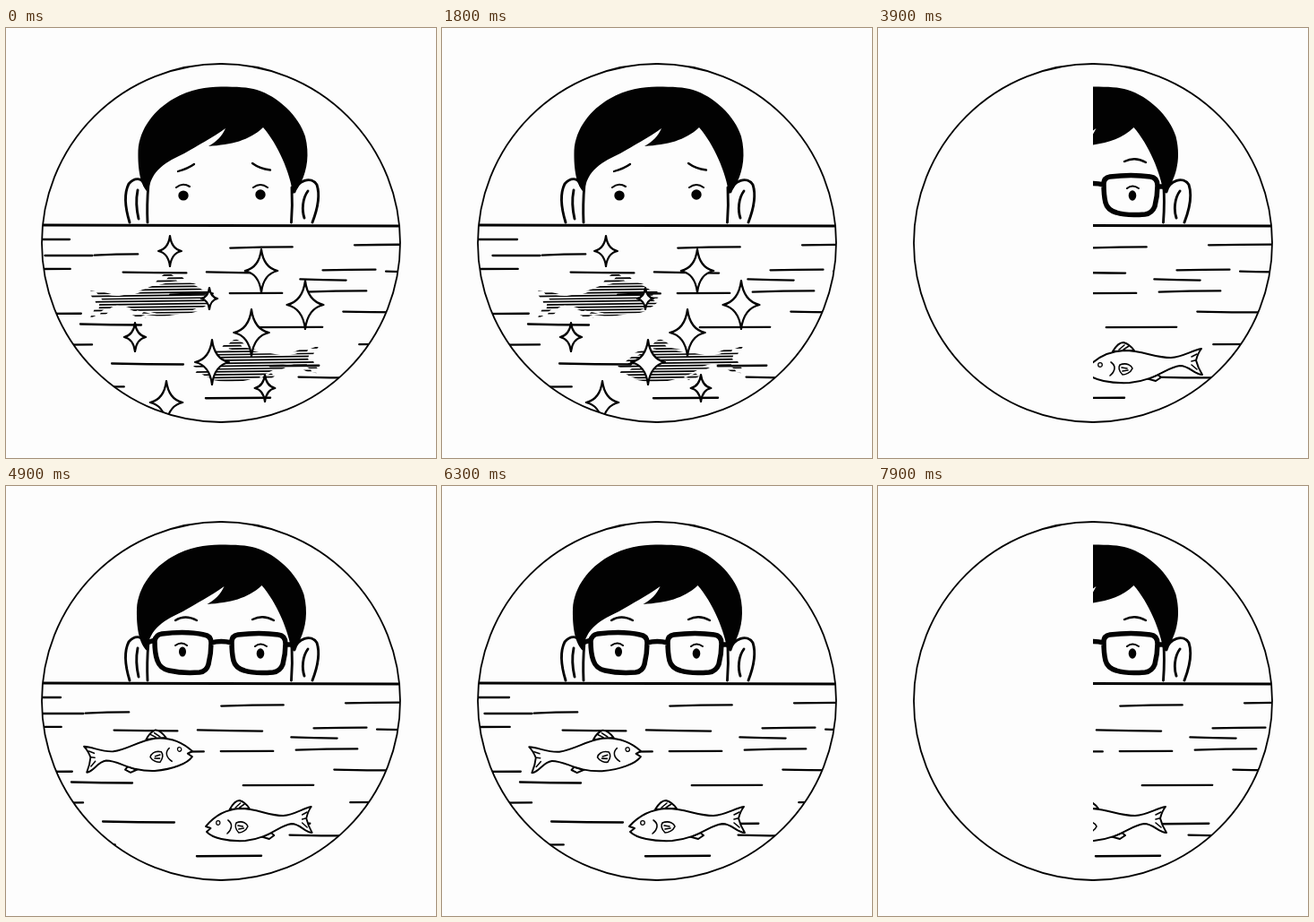
Write an HTML page with a canvas that moves like this. It is 480x480 px and loops after 8 s.

```html
<!DOCTYPE html>
<html lang="en">
<head>
<meta charset="utf-8">
<title>Man in the water</title>
<style>
html, body { margin: 0; width: 100%; height: 100%; overflow: hidden; background: #fdfdfd; }
canvas { display: block; width: 480px; height: 480px; }
</style>
</head>
<body>
<canvas id="stage" width="480" height="480"></canvas>
<script>
const ctx = document.getElementById('stage').getContext('2d');
const INK = '#020202', PAPER = '#fdfdfd';

// Centres of the ripples, by length
const longRipples = [
  [38, 236], [289, 245], [433, 242], [170, 273], [264, 273], [36, 269], [372, 294], [50, 319],
  [419, 317], [121, 331], [318, 334], [63, 354], [433, 353], [162, 375], [366, 390], [263, 413], [96, 401]
];
const shortRipples = [
  [74, 254], [127, 253], [387, 270], [453, 272], [358, 281], [283, 296], [211, 297], [326, 377]
];

// Sparkles: centre and half height
const sparkles = [
  [183, 249, 17], [285, 271, 24], [227, 302, 12], [334, 309, 27], [274, 340, 26],
  [144, 345, 16], [230, 373, 25], [289, 402, 15], [179, 418, 24]
];

const hair = new Path2D(`M159 184 C150 176 147 158 147.500 137 C149 112 166 91 187 79
  C206 68 224 66 240 65.500 C258 65.500 270 66 280 69 C303 76 327 98 334 121 C339 141 336 158 330 171
  C327 177 324 182 320 185 C318 163 303 129 287 111 C271 126 252 130 226 132
  C235 127 241 121 245 112 C230 123 214 131 199 140 C180 149 161 158 159 184Z`);
const head = new Path2D(`M159 174 Q157 198 158 217 M319 178 Q320 198 318.500 217
  M155 176 C152 166 143 167 137 174 C131 186 134 204 138 217 M147 181 Q144 196 148 213
  M322 183 C325 170 341 165 347 175 C351 187 347 204 342 217 M337 182 C331 190 330 203 333 212`);
const sadBrows = new Path2D('M192 160 Q203 157 210 152 M275 151 Q283 157 295 158.500');
const lids = new Path2D('M190 178 Q197 172 205 177 M276 178 Q284 172 292 178');
const calmBrows = new Path2D('M189 150 Q200 143 213 150 M275 149 Q287 143 299 150');
const smallLids = new Path2D('M189 178 Q196 173 202 178 M278 179 Q284 174 291 179');
const glasses = new Path2D(`M174 165 C190 163 208 163 221 166 Q229 167 229 175 C229 184 228 191 226 199
  Q224 207 216 208 C204 209 191 208 182 206 Q172 204 169 195 C166 187 166 180 166 173 Q167 166 174 165Z
  M259 166 C274 164 291 164 304 166 Q312 167 312 176 C312 184 311 191 309 199
  Q306 207 298 208 C287 209 275 209 266 206 Q256 203 254 195 C252 187 252 180 252 174 Q252 167 259 166Z
  M229 175 Q240 172 252 175 M312 177 L322 177 M166 172 L160 174`);

// Fish facing left, mouth at the origin
const fishBody = new Path2D(`M0 0 C8 -9 20 -19 42 -20 C62 -20 76 -12 94 -12 C108 -13 117 -20 128 -22
  Q124 -17 122 -9 Q124 -1 129 7 C120 7 115 -3 104 -3 C88 -1 78 13 48 16 C26 17 8 13 1 6 L6 2Z`);
const fishFins = new Path2D(`M29 -19 Q35 -29 41 -29 Q48 -27 53 -20Z M66 11 L77 14 L83 10 L78 6Z`);
const fishMarks = new Path2D(`M36 -21 L42 -26 M41 -21 L47 -25 M71 11 L78 8
  M27 -7 C33 -3 32 3 26 8 M37 -4 C45 -7 50 -3 51 0 C49 5 43 7 40 7 Q34 1 37 -4Z
  M39 -1 L45 0 M40 3 L46 2 M117 -13 L123 -16 M117 -8 L121 -9 M117 -4 L123 1`);
const silhouette = new Path2D(fishBody);
silhouette.addPath(fishFins);

function stroke(path, width) {
  ctx.lineWidth = width;
  path ? ctx.stroke(path) : ctx.stroke();
}

function ripples(list, length, dx, dy) {
  list.forEach(([x, y], i) => {
    const half = length / 2 + 3 * Math.sin(i * 4), tilt = Math.sin(i * 5) * 0.6;
    ctx.beginPath();
    ctx.moveTo(x + dx - half, y + dy - tilt);
    ctx.quadraticCurveTo(x + dx, y + dy + tilt, x + dx + half, y + dy + tilt);
    stroke(null, 2.3);
  });
}

function water(dx, dy) {
  ripples(longRipples, 74, dx, dy);
  ripples(shortRipples, 53, dx, dy);
}

// Fish silhouette filled with ragged horizontal strokes
function shadow(x, y, sx, angle) {
  for (let row = -29; row < 27; row += 3.2) {
    ctx.save();
    ctx.translate(x + 5 * Math.sin(row * 9), y);
    ctx.save();
    const shape = new Path2D();
    shape.addPath(silhouette, new DOMMatrix().rotate(angle * 180 / Math.PI).scale(sx, 1.05));
    ctx.restore();
    ctx.clip(shape);
    ctx.beginPath();
    ctx.moveTo(-150, row + 2);
    ctx.lineTo(150, row - 2);
    stroke(null, 1.7);
    ctx.restore();
  }
}

function sparkle(x, y, h) {
  const w = h * 0.76, k = 0.14;
  ctx.beginPath();
  ctx.moveTo(x, y - h);
  for (const [sx, sy, ex, ey] of [[1, -1, w, 0], [1, 1, 0, h], [-1, 1, -w, 0], [-1, -1, 0, -h]])
    ctx.quadraticCurveTo(x + sx * w * k, y + sy * h * k, x + ex, y + ey);
  ctx.closePath();
  ctx.fill();
  stroke(null, 2.2);
}

function fish(x, y, sx, angle) {
  ctx.save();
  ctx.translate(x, y);
  ctx.rotate(angle);
  ctx.scale(sx, 1);
  for (const path of [fishFins, fishBody]) {
    ctx.fill(path);
    stroke(path, 2);
  }
  stroke(fishMarks, 1.6);
  ctx.beginPath();
  ctx.arc(15, -4, 2.3, 0, 7);
  stroke(null, 1.3);
  ctx.restore();
}

function pupil(x, y, rx, ry) {
  ctx.beginPath();
  ctx.ellipse(x, y, rx, ry, 0, 0, 7);
  ctx.fill();
}

function face(worn) {
  ctx.fillStyle = INK;
  ctx.save();
  if (worn) ctx.translate(-1.5, 0);
  ctx.fill(hair);
  ctx.restore();
  stroke(head, 2.9);
  stroke(worn ? calmBrows : sadBrows, 2.3);
  stroke(worn ? smallLids : lids, 2.1);
  pupil(worn ? 197 : 198, worn ? 185 : 187, worn ? 4 : 5.7, 5.5);
  pupil(284, worn ? 187 : 186, worn ? 4.3 : 5.7, 5.7);
  if (worn) stroke(glasses, 5.5);
  ctx.fillStyle = PAPER;
}

function sadScene(step, alt) {
  water(step - (alt ? 12 : 4), alt ? 2 : 0);
  const size = alt ? 0.98 : 1.02;
  shadow(228 + step, 298, -size, -0.14);
  shadow(214 - step, 378, size, 0);
  for (const [x, y, h] of sparkles)
    alt ? sparkle(x + 3, y + 3, Math.min(26, 41 - h)) : sparkle(x, y, h);
}

function fishScene(n, alt) {
  const shift = n - 63;
  water(shift, 0);
  fish(222 + shift, 296, alt ? -0.93 : -0.96, -0.14);
  fish(209 - shift, 380, alt ? 0.92 : 1, 0);
}

function ring() {
  ctx.beginPath();
  ctx.arc(240, 240, 200, 0, 2 * Math.PI);
}

function draw(now) {
  const n = Math.floor(now % 8000 / 100);
  const step = Math.max(0, n - 5);
  const alt = step > 0 && n % 4 < 2;
  const second = n >= 35;
  const edge = second ? Math.max(440 - 40 * (n - 34), 40 * (n - 73)) : Math.min(440, 40 * (n - 19));

  ctx.fillStyle = PAPER;
  ctx.strokeStyle = INK;
  ctx.lineCap = ctx.lineJoin = 'round';
  ctx.fillRect(0, 0, 480, 480);
  if (edge < 440) {
    ctx.save();
    ring();
    ctx.clip();
    ctx.beginPath();
    ctx.rect(Math.max(0, edge), 0, 480, 480);
    ctx.clip();
    face(second);
    ctx.beginPath();
    ctx.moveTo(40, 220);
    ctx.lineTo(440, 221);
    stroke(null, 2.9);
    second ? fishScene(n, alt) : sadScene(step, alt);
    ctx.restore();
  }
  ring();
  stroke(null, 1.8);
  requestAnimationFrame(draw);
}
requestAnimationFrame(draw);
</script>
</body>
</html>
```
